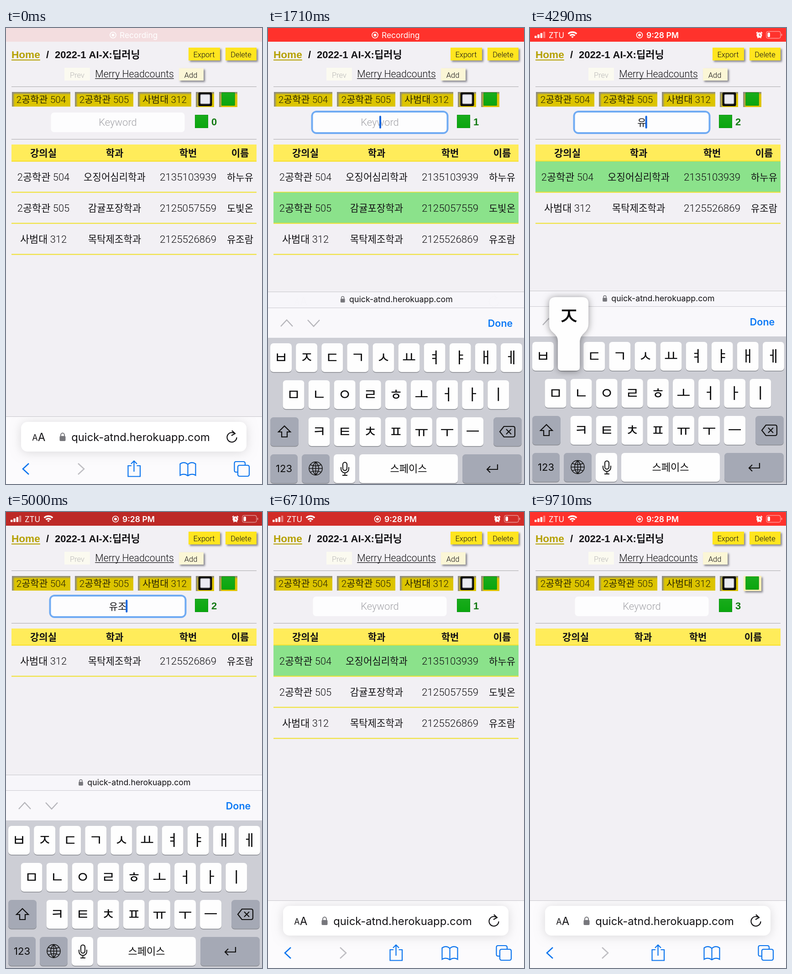
Animation, 561 px wide and 998 px high, one loop 9.85 s. Source, as an HTML page with a canvas:

```html
<!DOCTYPE html>
<html lang="ko">
<head>
<meta charset="utf-8">
<title>Attendance check</title>
<style>
html, body { margin: 0; width: 100%; height: 100%; overflow: hidden; background: #f2f0f4; }
canvas { display: block; }
</style>
</head>
<body>
<canvas id="stage" width="561" height="998"></canvas>
<script>
const ctx = document.getElementById('stage').getContext('2d');
const W = 561, H = 998, LOOP = 9850;
const CJK = '"Noto Sans CJK KR", "Noto Sans CJK JP", sans-serif';
const PAGE = 'Roboto, ' + CJK, BOLD = '"Liberation Sans", ' + CJK, UI = 'Inter, ' + CJK;
const INK = '#121114', BLUE = '#0a74ee';

const rows = [
  ['2공학관 504', '오징어심리학과', '2135103939', '하누유'],
  ['2공학관 505', '감귤포장학과', '2125057559', '도빛온'],
  ['사범대 312', '목탁제조학과', '2125526869', '유조람'],
];
const heads = ['강의실', '학과', '학번', '이름'];
const cellSize = [21.9, 21.1, 22.4, 21];
const keyRows = ['ㅂㅈㄷㄱㅅㅛㅕㅑㅐㅔ', 'ㅁㄴㅇㄹㅎㅗㅓㅏㅣ', 'ㅋㅌㅊㅍㅠㅜㅡ'];
const keyStart = [5, 32.5, 88.5];

// [time, row] and [time, field text, pressed key]
const taps = [[700, 1], [3235, 0], [5150, 2], [5840, 1], [6350, 2], [7150, 1], [7600, 2]];
const inputs = [[0, ''], [2250, 'ㅎ', 'ㅎ'], [2600, '하', 'ㅏ'], [3235, ''],
  [3640, 'ㅇ', 'ㅇ'], [3960, '유', 'ㅠ'], [4360, '유ㅈ', 'ㅈ'], [4720, '유조', 'ㅗ'], [5150, '']];
const FOCUS = 1310, BLUR = 5840, HIDE_CHECKED = 8700, PRESS = 150;

const clamp = x => Math.max(0, Math.min(1, x));
const easeOut = (x, n) => 1 - (1 - clamp(x)) ** n;

function box(x, y, w, h, fill, r = 0) {
  ctx.fillStyle = fill;
  ctx.beginPath();
  ctx.roundRect(x, y, w, h, r);
  ctx.fill();
}
function text(s, x, y, size, color = INK, weight = 300, face = PAGE, align = 'center') {
  ctx.font = `${weight} ${size}px ${face}`;
  ctx.fillStyle = color;
  ctx.textAlign = align;
  ctx.fillText(s, x, y + size * 0.36);
  return ctx.measureText(s).width;
}
function line(d, color, width) {
  ctx.strokeStyle = color;
  ctx.lineWidth = width;
  ctx.stroke(new Path2D(d));
}
function group(draw, alpha = 1, dx = 0, dy = 0, scale = 1) {
  ctx.save();
  ctx.globalAlpha *= alpha;
  ctx.translate(dx, dy);
  ctx.scale(scale, scale);
  draw();
  ctx.restore();
}
function shaded(draw, color, blur, x, y) {
  ctx.save();
  Object.assign(ctx, { shadowColor: color, shadowBlur: blur, shadowOffsetX: x, shadowOffsetY: y });
  draw();
  ctx.restore();
}
const raised = (x, y, w, h, fill) => shaded(() => box(x, y, w, h, fill), 'rgba(60,60,70,.6)', 4, 3, 3);

function pressed(x, y, w, h) {
  box(x, y, w, h, '#dcc400');
  for (const [dx, dy] of [[6, 0], [0, 6]]) {
    const g = ctx.createLinearGradient(x, y, x + dx, y + dy);
    g.addColorStop(0, 'rgba(140,138,138,.9)');
    g.addColorStop(0.4, 'rgba(140,138,130,.8)');
    g.addColorStop(1, 'rgba(140,138,130,0)');
    box(x, y, dx || w, dy || h, g);
  }
}
function greenSquare(x, y) {
  const g = ctx.createLinearGradient(0, y, 0, y + 29);
  g.addColorStop(0, '#19ac1c');
  g.addColorStop(1, '#0aa60e');
  box(x, y, 29, 29, g, 2);
  ctx.strokeStyle = '#0d9412';
  ctx.lineWidth = 1;
  ctx.strokeRect(x + 0.5, y + 0.5, 28, 28);
}

function rowState(i, t) {
  const mine = taps.filter(([at, row]) => row === i && at <= t);
  if (!mine.length) return { on: 0, level: 0 };
  const on = mine.length % 2;
  const e = easeOut((t - mine[mine.length - 1][0]) / 300, 2);
  return { on, level: on ? e : 1 - e };
}

function drawPage(t) {
  box(0, 0, W, H, '#f2f0f4');
  const home = text('Home', 12, 58, 22.6, '#b5a000', 700, BOLD, 'left');
  box(12, 69, home, 2, '#b5a000');
  text('/', 91, 58, 22, INK, 700, BOLD);
  text('2022-1 AI-X:딥러닝', 107, 58, 22, INK, 700, BOLD, 'left');
  raised(400, 43, 69, 28, '#ffe51f');
  raised(481, 43, 68, 28, '#ffe51f');
  text('Export', 434, 58, 16.5);
  text('Delete', 515, 58, 16.5);
  box(128, 87, 56, 28, '#fbfaf0');
  text('Prev', 156, 103, 16.5, '#b9b8b8');
  const title = text('Merry Headcounts', 281.5, 100, 21.3);
  box(281.5 - title / 2, 110, title, 1.2, INK);
  raised(379, 88, 54, 27, '#fbf6d6');
  text('Add', 405, 103, 16.5);
  box(12, 128, 537, 1, '#a9a8ab');
  box(12, 243, 537, 1, '#a9a8ab');

  [['2공학관 504', 13, 128], ['2공학관 505', 151, 128], ['사범대 312', 289, 117]].forEach(([s, x, w]) => {
    pressed(x, 140, w, 32);
    text(s, x + w / 2, 157, 20.8, '#2a2504');
  });
  pressed(416, 140, 40, 33);
  box(421.5, 141, 30, 30, '#0c0c0e', 3);
  box(425.5, 145, 22, 21.5, '#a5a5ac', 3);
  box(427, 146.5, 19, 18.5, '#ebebf1', 1);
  const hide = t >= HIDE_CHECKED;
  if (hide) raised(468, 140, 39, 33, '#fff1b4');
  else pressed(467, 140, 40, 33);
  greenSquare(472.5, 141);

  const focused = t >= FOCUS && t < BLUR;
  const query = inputs.filter(e => e[0] <= t).pop()[1];
  if (focused) box(94.5, 181, 301, 51, '#70abf3', 12);
  box(98.5, 185, 293, 43, '#fdfdfe', 7);
  const typed = query ? text(query, 245, 206, 21)
    : (text('Keyword', 245, 206, 22, '#a2a2a7'), 0);
  if (focused) box(244 + (typed ? typed / 2 - 1 : 0), 192, 4, 28, '#1565dc', 2);

  const states = rows.map((r, i) => rowState(i, t));
  greenSquare(414, 190);
  text(states.reduce((n, s) => n + s.on, 0), 456, 205, 22, '#137a13', 700, BOLD);

  const shown = [0, 1, 2].filter(i => rows[i].join().includes(query) && !(hide && states[i].on));
  const cols = hide ? [100, 248, 368, 489] : [82, 238, 399, 513];
  box(12, 255, 537, 37, '#ffec5a');
  box(12, 290.5, 537, 2, '#f8df22');
  heads.forEach((s, c) => text(s, cols[c], 273, 21, INK, 700));
  shown.forEach((i, n) => {
    const y = 292 + 68 * n;
    group(() => box(12, y, 537, 68, '#8be28b'), states[i].level);
    box(12, y + 66.5, 537, 2, '#f0e12c');
    rows[i].forEach((s, c) => text(s, cols[c], y + 34, cellSize[c]));
  });
}

function lock(x, y) {
  box(x - 6.5, y - 2, 13, 11, '#77777c', 2);
  line(`M${x - 4} ${y}v-4a4 4.5 0 0 1 8 0v4`, '#77777c', 2);
}

function drawToolbar(hidden, bottom) {
  const height = 34 + 114 * easeOut(hidden, 1.24), top = bottom - height;
  ctx.save();
  ctx.beginPath();
  ctx.rect(0, top, W, height);
  ctx.clip();
  ctx.translate(0, top);
  box(0, 0, W, height, hidden > 0.9 ? '#fcfbfd' : '#f7f6fa');
  const boxTop = -12 + 24 * hidden ** 2.2;
  group(() => {
    shaded(() => box(33, boxTop, 494, 65, '#fff', 14), 'rgba(0,0,0,.13)', 22, 0, 2);
    const y = boxTop + 33;
    text('A', 63.5, y + 2, 18, INK, 400, UI);
    text('A', 78, y, 24, INK, 400, UI);
    line(`M502 ${y - 7}A10.5 10.5 0 1 0 505.5 ${y + 1}M495 ${y - 14}L502 ${y - 7.5}L494 ${y - 3}`, INK, 2.2);
  }, hidden);
  group(() => {
    lock(-157, 0);
    text('quick-atnd.herokuapp.com', 14, 0, 23.8, INK, 400, UI);
  }, 1, 281, 17 + 28 * hidden ** 3, 0.745 + 0.255 * hidden);
  group(() => {
    line('M50 -12L37 0L50 12', BLUE, 2.6);
    line('M158 -12L171 0L158 12', '#bfbec3', 2.6);
    line('M275 -7H267.500V16.500H294V-7H286.500M280.500 6V-17M274 -11L280.500 -17.500L287 -11', BLUE, 2.2);
    line('M398.500 -10Q390 -17 381.500 -11V14Q390 9 398.500 15Q407 9 415.500 14V-11Q407 -17 398.500 -10V15', BLUE, 2.2);
    line('M508 7H504Q500.500 7 500.500 3V-12Q500.500 -16 504 -16H520Q524 -16 524 -12V-8M512 -8H529Q533 -8 533 -4V12Q533 16 529 16H512Q508 16 508 12V-4Q508 -8 512 -8Z', BLUE, 2.2);
  }, hidden, 0, 115 - 30 * (1 - hidden));
  box(0, 0, W, 1, '#c6c5ca');
  ctx.restore();
}

function key(x, y, w, label, size = 33, gray) {
  box(x, y + 1.5, w, 63, '#898b91', 7);
  box(x, y, w, 63, gray ? '#a5a9b5' : '#fefefe', 7);
  if (label) text(label, x + w / 2, y + 31, size, '#0b0b0c', 400, UI);
}

function drawKeyboard(t) {
  box(0, 609, W, 66, '#f9f8fb');
  box(0, 609, W, 1, '#cbcacf');
  line('M28 650L41 636L54 650M87 636L100 650L113 636', '#b6b6bb', 2.4);
  text('Done', 509, 643, 21.5, '#0a78f5', 600, UI);
  box(0, 675, W, 323, '#cdced5');

  const press = inputs.find(e => e[2] && t >= e[0] - PRESS && t < e[0]);
  let popup;
  keyRows.forEach((chars, r) => [...chars].forEach((c, i) => {
    const x = keyStart[r] + 56.1 * i, y = 687 + 81 * r;
    key(x, y, 47, c);
    if (press && press[2] === c) popup = [x, y, c];
  }));
  key(5, 849, 62, '', 0, true);
  line('M36 868L49 881H42V892H30V881H23Z', '#111', 2.2);
  key(494, 849, 62, '', 0, true);
  line('M517 869H537Q541 869 541 873V888Q541 892 537 892H517L508 880.500ZM522 875L533 886M533 875L522 886', '#111', 2.2);
  key(5, 930, 60, '123', 22, true);
  key(74, 930, 61, '', 0, true);
  line('M90 961a14.500 14.500 0 1 0 29 0a14.500 14.500 0 1 0 -29 0H119M104.500 946.500V975.500M104.500 946.500Q91 961 104.500 975.500Q118 961 104.500 946.500M93 953Q104.500 958 116 953M93 969Q104.500 964 116 969', '#111', 1.6);
  key(144, 930, 47);
  line('M164 952a4.500 4.500 0 0 1 9 0v9a4.500 4.500 0 0 1 -9 0zM160 958v4a8.500 8.500 0 0 0 17 0v-4M168.500 971v5M163 976h11', '#111', 2);
  key(200, 930, 216, '스페이스', 22);
  key(426, 930, 130, '', 0, true);
  line('M503 952V963H480M487 956L480 963L487 970', '#111', 2.2);

  if (popup) {
    const [x, y, c] = popup;
    const shape = new Path2D(`M${x - 5} ${y - 98}h58q14 0 14 14v44q0 12 -9 20t-10 18v57q0 8 -8 8h-32q-8 0 -8 -8v-57q0 -10 -10 -18t-9 -20v-44q0 -14 14 -14z`);
    ctx.fillStyle = '#fefefe';
    shaded(() => ctx.fill(shape), 'rgba(0,0,0,.4)', 15, 0, 1);
    text(c, x + 24, y - 56, 56, '#0b0b0c', 400, UI);
  }
}

function recordMark(x) {
  line(`M${x - 6.5} 15.500a6.500 6.500 0 1 0 13 0a6.500 6.500 0 1 0 -13 0`, '#fff', 1.6);
  box(x - 3, 12.5, 6, 6, '#fff', 3);
}

function drawStatus(t) {
  // The red bar fades in once, then dims in the middle of every two seconds.
  const phase = (t % 2000 - 1000) / 750;
  const dim = t > 2000 && Math.abs(phase) < 1 ? (1 + Math.cos(Math.PI * phase)) / 2 : 0;
  group(() => box(0, 0, W, 30, `rgb(${255 - 66 * dim},${50 - 9 * dim},${44 - 6 * dim})`),
    0.1 + 0.9 * clamp((t - 140) / 400));
  const timeIn = clamp((t - 3050) / 260), sides = clamp((t - 3150) / 350);
  group(() => {
    recordMark(234.5);
    text('Recording', 249, 15.5, 17.4, '#fff', 400, UI, 'left');
  }, clamp((3340 - t) / 290));
  group(() => {
    recordMark(240);
    text('9:28 PM', 255, 15.5, 17.6, '#fff', 600, UI, 'left');
  }, timeIn);
  group(() => {
    for (let i = 0; i < 4; i++)
      box(10 + 6.3 * i, 17 - 3 * i, 4.5, 5 + 3 * i, i < 3 ? '#fff' : 'rgba(255,255,255,.4)', 1);
    text('ZTU', 41, 15.5, 16.8, '#fff', 400, UI, 'left');
    ctx.strokeStyle = '#fff';
    [2, 7.5, 13].forEach(r => {
      ctx.lineWidth = 3.6;
      ctx.beginPath();
      ctx.arc(93, 22, r, -Math.PI * 0.75, -Math.PI * 0.25);
      ctx.stroke();
    });
    box(496.5, 9.5, 12, 12, '#fff', 6);
    line('M496 11.500L499 8.500M509 11.500L506 8.500M498.500 22L500 20.500M506.500 22L505 20.500', '#fff', 2);
    line('M502.500 12V16H505.500', '#f43a34', 1.3);
    line('M522 7.500H545Q549 7.500 549 11.500V18.500Q549 22.500 545 22.500H522Q518 22.500 518 18.500V11.500Q518 7.500 522 7.500Z', 'rgba(255,255,255,.5)', 1.3);
    box(520.5, 10, 5.5, 10, '#fff', 2);
    box(550.5, 12.5, 2, 5, 'rgba(255,255,255,.5)', 1);
  }, sides);
}

function draw(now) {
  const t = now % LOOP;
  const hidden = t < BLUR ? 1 - easeOut((t - FOCUS) / 500, 3) : easeOut((t - BLUR) / 455, 3);
  const shift = 389 * hidden;
  drawPage(t);
  drawToolbar(hidden, 609 + shift);
  if (hidden < 1) group(() => drawKeyboard(t), 1, 0, shift);
  drawStatus(t);
}

const start = performance.now();
function tick() {
  draw(performance.now() - start);
  requestAnimationFrame(tick);
}
tick();
</script>
</body>
</html>
```
